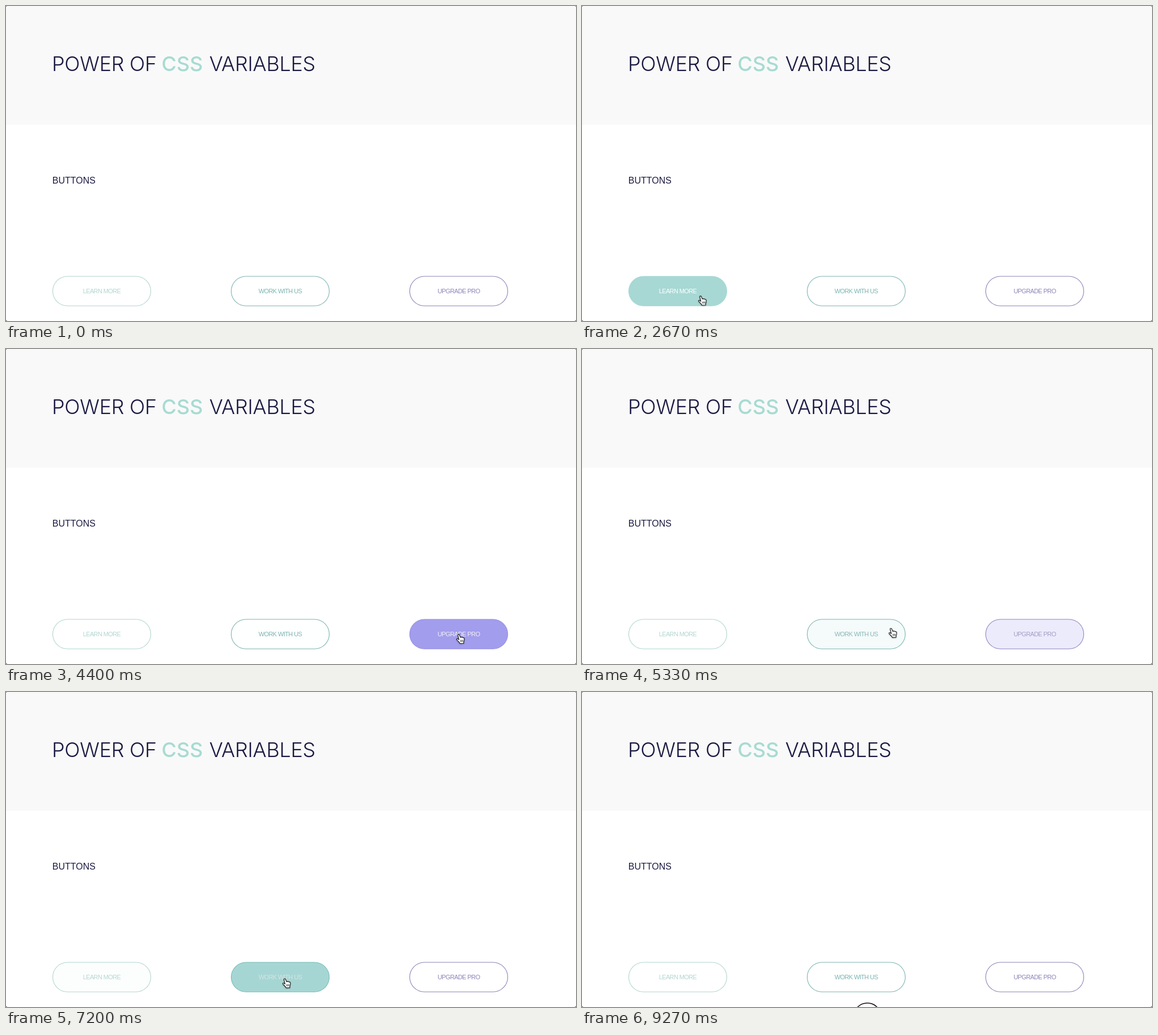
These frames come from a looping animation (1006x557 px, 9340 ms). An HTML page:

```html
<!DOCTYPE html>
<html lang="en">
<head>
<meta charset="utf-8">
<title>Buttons</title>
<style>
  html, body { margin: 0; width: 100%; height: 100%; overflow: hidden; background: #444; }
  svg { display: block; width: 1006px; height: 557px; background: #fff; border-radius: 3px; }
  text { font-family: "Liberation Sans", Arial, sans-serif; fill: #1b1a42; }
  .title { font: 300 36px Inter, sans-serif; letter-spacing: -.35px; }
  .title .accent { font-weight: 500; fill: #a7dbd2; letter-spacing: 0; }
  .section { font-size: 16px; }
  .label { font-size: 11px; letter-spacing: -.6px; text-anchor: middle; }
</style>
</head>
<body>
<svg viewBox="0 0 1006 557">
  <rect width="1006" height="210" fill="#f9f9f9"/>
  <text class="title" y="115"><tspan x="81">POWER OF</tspan><tspan class="accent" x="274.5">CSS</tspan><tspan x="358.7">VARIABLES</tspan></text>
  <text class="section" x="81.8" y="314">BUTTONS</text>
  <g id="buttons"></g>
  <circle id="ring" cx="503.5" cy="574" r="24" fill="#fff" stroke="#111" stroke-width="1.5"/>
  <g id="cursor">
    <path id="arrow" d="M0 0V13.5L3.2 10.6 5.3 15.6 7.6 14.6 5.5 9.8H9.8Z"
      fill="#000" stroke="#fff" stroke-width=".9" style="filter:drop-shadow(0 1px 1px #0005)"/>
    <g id="hand" transform="translate(-1)" stroke="#111" stroke-width="1.1" stroke-linejoin="round" style="filter:drop-shadow(0 1px 1px #0004)">
      <path fill="#fff" d="M-1.5 1.2C-2-.5 .5-1 1.2 .6L3 5C3.5 4 5 4 5.4 5 6.2 4.3 7.5 4.6 7.8 5.7 8.6 5.2 9.8 5.8 9.8 7 10 10 9.4 11.5 8.8 13V15.5L2.2 15.8C1.5 13.5-.8 12-3 9.5-4.6 7.8-3 6.6-1.6 7.6L.4 9Z"/>
      <path fill="none" stroke-width=".8" d="M3.4 9.5V13M5.3 9.4V12.9M7.2 9.3V12.8"/>
    </g>
  </g>
</svg>
<script>
const LOOP = 9340, FRAME = 1000 / 15, FADE = 400;
const BOX = { x: 82.5, y: 478, width: 173, height: 52.3, gap: 315 };
const $ = id => document.getElementById(id);

const buttons = [
  { label: 'LEARN MORE', ink: [178, 214, 208], fill: [167, 216, 212] },
  { label: 'WORK WITH US', ink: [124, 180, 177], fill: [120, 193, 188] },
  { label: 'UPGRADE PRO', ink: [140, 132, 184], fill: [150, 145, 234] }
];

// The pointer rests at each stop and eases to the next.
const stops = [
  { arrive: 1080, leave: 1080, x: -20, y: 553 },
  { arrive: 1600, leave: 2400, x: 115, y: 514 },
  { arrive: 3200, leave: 3900, x: 488, y: 511 },
  { arrive: 4300, leave: 4920, x: 800, y: 505 },
  { arrive: 5490, leave: 5650, x: 490, y: 492 },
  { arrive: 6450, leave: 6700, x: 160, y: 477 },
  { arrive: 7250, leave: 7938, x: 500, y: 508 },
  { arrive: 8043, leave: 8500, x: 800, y: 506 },
  { arrive: 9150, leave: 9150, x: 505, y: 585 }
];

function pointerAt(t) {
  const next = stops.findIndex(stop => stop.leave > t);
  if (next < 1) return null;
  const from = stops[next - 1], to = stops[next];
  const progress = Math.min(1, (t - from.leave) / (to.arrive - from.leave));
  const k = (1 - Math.cos(Math.PI * progress)) / 2;
  return { x: from.x + (to.x - from.x) * k, y: from.y + (to.y - from.y) * k };
}

function isInside(pointer, left) {
  return pointer !== null && pointer.x >= left && pointer.x <= left + BOX.width
    && pointer.y >= BOX.y && pointer.y <= BOX.y + BOX.height;
}

// Follows the pointer once through the loop and notes when it is over a button.
function findHovers(left) {
  const hovers = [];
  let wasInside = false;
  for (let t = 0; t < LOOP; t++) {
    const inside = isInside(pointerAt(t), left);
    if (inside && !wasInside) hovers.push({ enter: t, leave: LOOP });
    if (!inside && wasInside) hovers.at(-1).leave = t;
    wasInside = inside;
  }
  return hovers;
}

function addShape(name, attributes) {
  const node = document.createElementNS('http://www.w3.org/2000/svg', name);
  for (const key in attributes) node.setAttribute(key, attributes[key]);
  return $('buttons').appendChild(node);
}

buttons.forEach((button, i) => {
  const { y, width, height } = BOX, x = BOX.x + BOX.gap * i;
  button.left = x;
  button.hovers = findHovers(x);
  button.box = addShape('rect', { x, y, width, height, rx: height / 2, 'stroke-width': 1.1 });
  button.text = addShape('text', { class: 'label', x: x + width / 2, y: 508 });
  button.text.textContent = button.label;
});

const WHITE = [255, 255, 255];
const mix = (a, b, k) => `rgb(${a.map((v, i) => v + (b[i] - v) * k)})`;

// cubic-bezier(.25, .1, .25, 1)
function ease(progress) {
  if (progress <= 0) return 0;
  if (progress >= 1) return 1;
  const bezier = (a, b, s) => 3 * a * s * (1 - s) ** 2 + 3 * b * s * s * (1 - s) + s ** 3;
  let low = 0, high = 1;
  for (let i = 0; i < 20; i++) {
    const mid = (low + high) / 2;
    if (bezier(.25, .25, mid) < progress) low = mid; else high = mid;
  }
  return bezier(.1, 1, low);
}

const hoverLevel = (hovers, t) => Math.max(...hovers.map(({ enter, leave }) =>
  ease((t - enter) / FADE) - ease((t - leave) / FADE)));

const show = (id, visible) => { $(id).style.display = visible ? '' : 'none'; };

function render(t) {
  for (const { ink, fill, hovers, box, text } of buttons) {
    const level = hoverLevel(hovers, t);
    box.setAttribute('fill', mix(WHITE, fill, level));
    box.setAttribute('stroke', mix(ink, fill, level));
    text.style.fill = mix(ink, WHITE, level);
  }
  const pointer = pointerAt(t);
  const hovering = buttons.some(button => isInside(pointer, button.left));
  show('cursor', pointer);
  show('hand', hovering);
  show('arrow', !hovering);
  show('ring', t >= LOOP - 150);
  if (pointer) $('cursor').setAttribute('transform', `translate(${pointer.x} ${pointer.y})`);
}

function tick() {
  const t = performance.now() % LOOP;
  const step = Math.min(139, Math.floor((t + 3.4) / FRAME));
  render(Math.round(step * FRAME / 10) * 10);
  requestAnimationFrame(tick);
}
tick();
</script>
</body>
</html>
```
